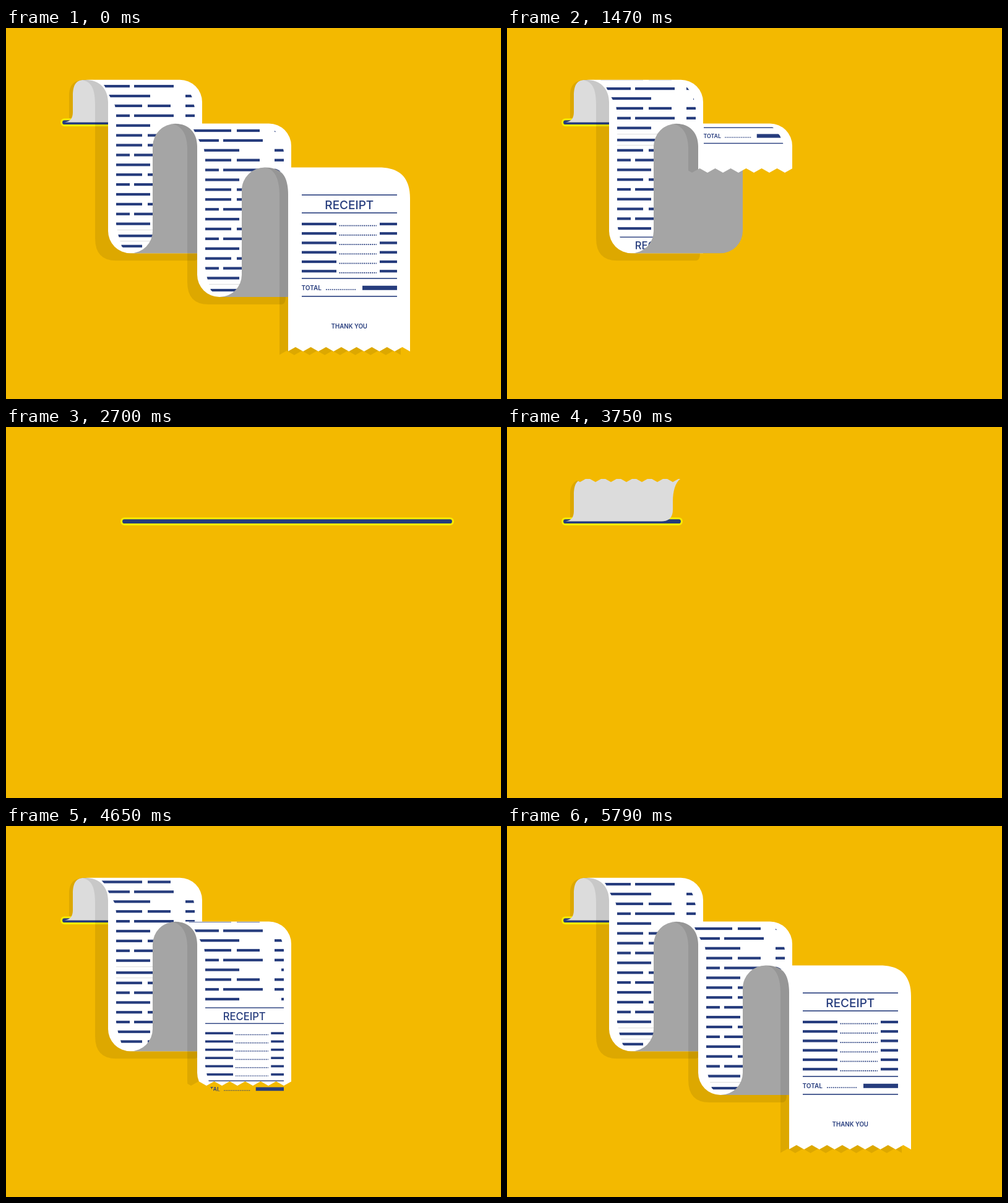
Recreate the animation shown at these times as an HTML page. Size 800 px wide and 600 px high, loop 5.94 s.

```html
<!DOCTYPE html>
<html lang="en">
<head>
<meta charset="utf-8">
<title>Receipt</title>
<style>
  html, body { margin: 0; width: 100%; height: 100%; overflow: hidden; background: #f3b900; }
  svg { display: block; width: 100vw; height: 100vh; }
  text { font-family: Inter, "Open Sans", sans-serif; fill: #263c7d; font-weight: 600; }
</style>
</head>
<body>
<svg id="stage" viewBox="0 0 800 600"></svg>
<script>
const NAVY = '#263c7d', BACK = '#a5a5a5', SHADE = 'fill="#000" fill-opacity=".09"';
const LOOP = 5940, STEP = 30;

// Smooth monotone curve through [time, value] points.
function track(points) {
  const n = points.length - 1;
  const slope = i => (points[i + 1][1] - points[i][1]) / (points[i + 1][0] - points[i][0]);
  const tangent = points.map((_, i) => {
    if (i === 0) return 0;
    if (i === n) return slope(n - 1);
    const a = slope(i - 1), b = slope(i);
    return a * b > 0 ? 2 * a * b / (a + b) : 0;
  });
  return t => {
    if (t <= points[0][0]) return points[0][1];
    if (t >= points[n][0]) return points[n][1];
    const i = points.findIndex(p => p[0] > t) - 1;
    const [t0, v0] = points[i], [t1, v1] = points[i + 1];
    const d = t1 - t0, u = (t - t0) / d, w = 1 - u;
    return v0 * (1 + 2 * u) * w * w + v1 * u * u * (3 - 2 * u)
      + d * u * w * (tangent[i] * w - tangent[i + 1] * u);
  };
}

// Torn edge with its low points at y; keeps what lies above or below it.
function torn(y, tipX, keep, step = 25) {
  const first = tipX - Math.ceil((tipX + 100) / step) * step;
  let d = '';
  for (let x = first; x < 1000; x += step) {
    d += `${d ? 'L' : 'M'}${x.toFixed(1)},${y.toFixed(1)}L${(x + step / 2).toFixed(1)},${(y - 7).toFixed(1)}`;
  }
  return `${d}V${keep === 'above' ? -300 : 900}H${first}Z`;
}

const bar = (x1, x2, y, h = 4.2) =>
  `<rect x="${x1}" y="${y - h / 2}" width="${x2 - x1}" height="${h}" fill="${NAVY}"/>`;
const dots = (x1, x2, y) =>
  `<path d="M${x1},${y}H${x2}" stroke="${NAVY}" stroke-width="1.7" stroke-dasharray="1.9 1.4"/>`;
const clip = (id, d = '') => `<clipPath id="${id}"><path id="${id}Path" d="${d}"/></clipPath>`;

function bill() {
  let s = [270, 299, 405, 434].map(y => bar(478, 632, y, 1.6)).join('');
  s += '<text x="554.8" y="292.6" font-size="19" text-anchor="middle" style="font-weight:500">RECEIPT</text>';
  for (let i = 0; i < 6; i++) {
    const y = 317 + 15.25 * i;
    s += bar(478, 534, y) + dots(538.5, 599, y + 2.6) + bar(604, 632, y);
  }
  return s + '<text x="477.5" y="424" font-size="10">TOTAL</text>' + dots(517, 566, 423) + bar(576, 632, 420.3, 7);
}

const ROWS = { A: [[280, 344], [351, 415]], B: [[280, 377]], C: [[280, 364], [373, 410]] };

function row(type, index, y) {
  let s = ROWS[type].map(([a, b]) => bar(a, b, y)).join('');
  if (index !== 8 && index !== 15) s += bar(type === 'B' && index % 7 ? 445 : 434, 455, y);
  return s;
}

// Printed strip; y = 0 is the middle of the heading.
function strip() {
  const join = -171;
  let s = `<g transform="translate(318 0) scale(.875) translate(-478 -286)">${bill()}</g>`;
  [...'BACBACBAC'].forEach((type, i) => s += row(type, i + 1, -28 - 15.8 * i));
  s += bar(280, 455, join);
  for (const dy of [-9.5, 8.5]) s += `<path d="M280,${join + dy}H455" stroke="#dcdcdc"/>`;
  [...'BACBACBACCBACBACBACBA'].forEach((type, i) => s += row(type, i + 1, join - 19.5 - 15.9 * i));
  return s;
}

const FRONT = 'M272,154.5H425A36,36 0 0 1 461,190.5V435H345A36,36 0 0 1 309,399V191C309,170 296,154.5 272,154.5Z';
const REVERSE = 'M345,435A36,36 0 0 0 381,399V262A37,37 0 0 1 418,225.5C444,225.5 456,240 456,262H525V399A36,36 0 0 1 489,435Z';
const PRINT = 'M295,155L303,164L311,180L320,196L322,210V388L325,404L331,424L336,428.5H449V200L446,186L441,174L430,161L424,155Z';
const LAST = 'M422,225.5H602C638,225.5 653,243 653,276V540H456V270C456,240 446,225.5 422,225.5Z';

const shadow = (x, right) =>
  `M262,154.5C284,155 ${x},172 ${x},196V411Q${x},447 ${x + 34},447H${right - 6}Q${right},446 ${right},435V191C309,170 296,154.5 272,154.5Z`;

function sheet(id, dx, dy, shadowX, shadowEnd) {
  return `<g transform="translate(${dx} ${dy})">
    <g clip-path="url(#front${id})"><path d="${shadow(shadowX, shadowEnd)}" ${SHADE}/><path d="${FRONT}" fill="#fff"/></g>
    <g id="print${id}" clip-path="url(#printMask)"><g id="strip${id}">${strip()}</g></g>
    <g clip-path="url(#back${id})"><path d="${REVERSE}" fill="${BACK}"/></g>
  </g>`;
}

document.getElementById('stage').innerHTML = `
  <defs>
    ${['front1', 'back1', 'front2', 'back2', 'front3', 'shade3', 'back0'].map(id => clip(id)).join('')}
    ${clip('printMask', PRINT)}${clip('lastMask', LAST)}
  </defs>
  <rect width="800" height="600" fill="#f3b900"/>
  <g id="slot" stroke-linecap="round">
    <path class="slot" stroke="#f8ec00" stroke-width="13"/>
    <path class="slot" stroke="${NAVY}" stroke-width="6.8"/>
  </g>
  <g clip-path="url(#back0)">
    <path d="M124,84C108,85 102,94 102,110V146H108V112Z" ${SHADE}/>
    <path d="M126,84H280C272,90 268,104 268,120V134C268,146 262,152.5 250,152.5H95C104,151 108,146 108,136V110C108,94 112,84 126,84Z" fill="#dcdcdc"/>
  </g>
  ${sheet(1, -144, -70.8, 288, 456)}
  ${sheet(2, 0, 0, 293, 452)}
  <g clip-path="url(#shade3)"><path id="lastShadow" ${SHADE}/></g>
  <g clip-path="url(#front3)"><path d="${LAST}" fill="#fff"/></g>
  <g id="print3" clip-path="url(#lastMask)"><g id="strip3">${bill()}
    <text x="554.8" y="486.3" font-size="9.7" text-anchor="middle">THANK YOU</text></g></g>`;

const motion = {
  front3: track([[150, 523], [450, 517], [660, 480], [780, 423], [1050, 215]]),
  text3: track([[150, 0], [450, -12], [660, -72], [780, -135], [1050, -370]]),
  back2: track([[1050, 215], [1160, 312], [1270, 440]]),
  front2: track([[1150, 480], [1270, 440], [1290, 420], [1470, 234], [1550, 140]]),
  text2: track([[150, 595], [450, 590], [780, 560], [1080, 440], [1290, 308], [1470, 57], [1600, -150]]),
  back1: track([[1545, 215], [1650, 322], [1755, 440]]),
  front1: track([[1640, 480], [1750, 441], [1950, 326], [2160, 140]]),
  text1: track([[150, 578], [780, 556], [1290, 479], [1470, 423], [1770, 290], [1950, 150], [2150, -120]]),
  back0: track([[2140, 74], [2190, 82], [2250, 112], [2300, 160]]),
  slotLeft: track([[2250, 94.5], [2310, 95.5], [2550, 120.5], [2700, 191.5], [2800, 350], [2880, 680], [2910, 850]]),
  slotRight: track([[2220, 277.5], [2400, 310], [2550, 399.5], [2700, 717.5], [2760, 900]])
};

const byId = id => document.getElementById(id);
const setPath = (id, d) => byId(id).setAttribute('d', d);
const show = (id, on) => byId(id).setAttribute('display', on ? 'inline' : 'none');
const shift = (id, y) => byId(id).setAttribute('transform', `translate(0 ${y.toFixed(2)})`);

function draw(time) {
  const frame = Math.floor((time % LOOP) / STEP) * STEP;
  const t = Math.min(frame, LOOP - frame); // the second half replays the first backwards
  const at = name => motion[name](t);

  for (const id of [1, 2]) {
    const edge = at('front' + id);
    setPath(`front${id}Path`, torn(edge, 299, 'above'));
    setPath(`back${id}Path`, torn(at('back' + id) + 7, 299, 'below'));
    shift('strip' + id, at('text' + id));
    show('print' + id, edge > 155);
  }

  const edge = at('front3');
  setPath('front3Path', torn(edge, 455.6, 'above', 24.65));
  setPath('shade3Path', torn(edge + 6, 441.3, 'above', 24.65));
  const right = 638 - 182 * Math.min(1, Math.max(0, (t - 180) / 300));
  setPath('lastShadow', `M416,225.5C436,227 442,246 442,272V540H${right}V270C456,240 446,225.5 422,225.5Z`);
  shift('strip3', at('text3'));
  show('print3', edge > 226);

  setPath('back0Path', torn(at('back0') + 7, 118, 'below'));
  const line = `M${at('slotLeft')},152.7H${Math.max(at('slotLeft'), at('slotRight'))}`;
  document.querySelectorAll('.slot').forEach(p => p.setAttribute('d', line));
  show('slot', t < 2910);
}

const start = performance.now();
function tick() {
  draw(performance.now() - start);
  requestAnimationFrame(tick);
}
draw(0);
requestAnimationFrame(tick);
</script>
</body>
</html>
```
